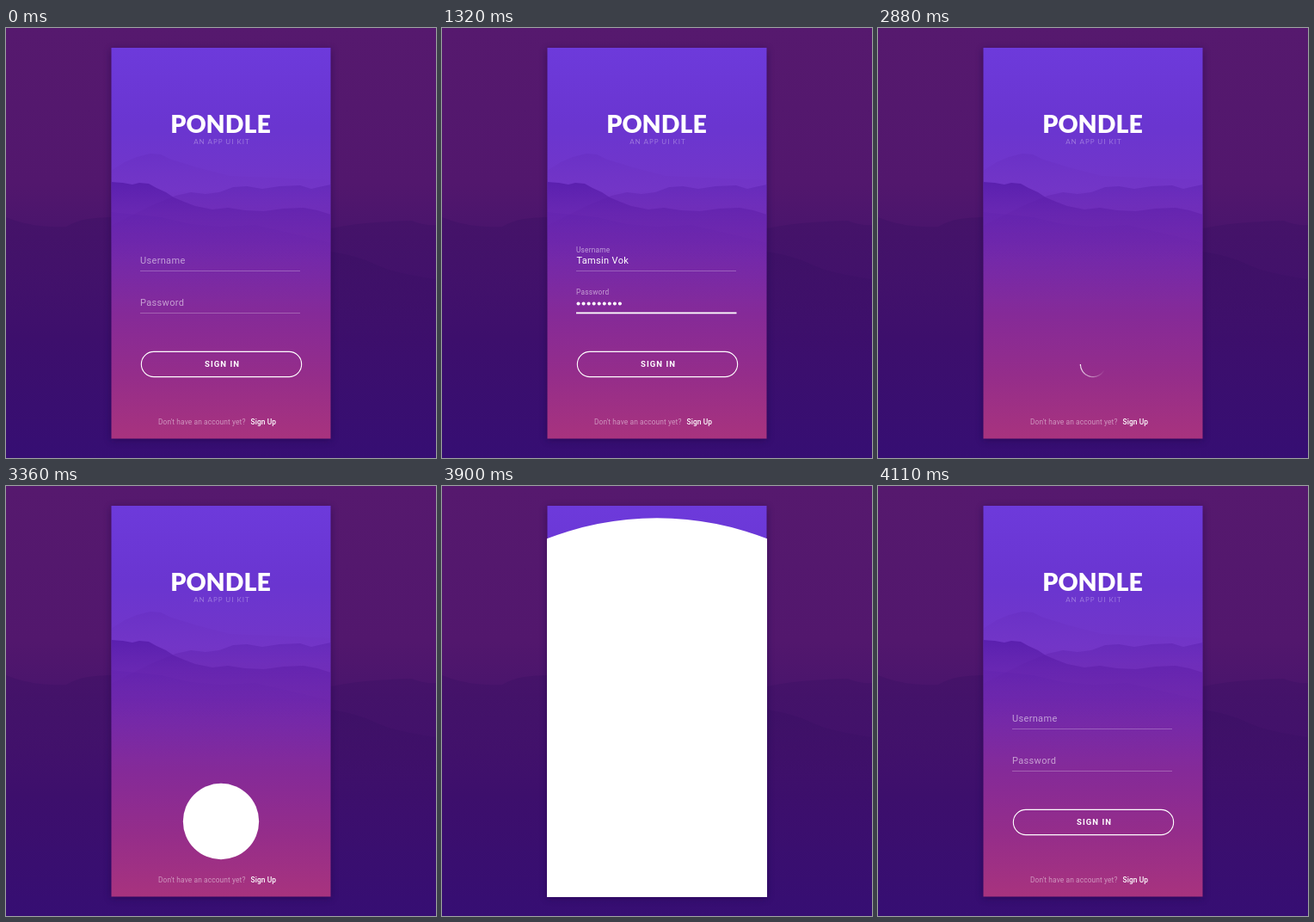
These frames come from a looping animation (500x500 px, 4.17 s). An HTML page:

```html
<!DOCTYPE html>
<html lang="en">
<head>
<meta charset="utf-8">
<title>Sign in</title>
<style>
  html, body { margin: 0; width: 100%; height: 100%; overflow: hidden; background: #45136b; }
  svg { display: block; width: 100vw; height: 100vh; }
  text { font-family: Roboto, sans-serif; fill: #fff; white-space: pre; }
  .brand { font: 900 28.5px Lato, sans-serif; }
  .tag { font: 400 8px Lato, sans-serif; letter-spacing: 1px; opacity: .32; }
  .label, .value { font-size: 11px; letter-spacing: .33px; }
  .label { opacity: .55; }
  .button { font-size: 9.5px; font-weight: 700; letter-spacing: 1.05px; }
  .foot { font-size: 8.4px; letter-spacing: .1px; }
  .link { font-weight: 500; }
</style>
</head>
<body>
<svg viewBox="0 0 500 500">
  <defs>
    <linearGradient id="back" x2="0" y2="1">
      <stop offset="0" stop-color="#56196e"/>
      <stop offset=".36" stop-color="#52176d"/>
      <stop offset=".5" stop-color="#48146c"/>
      <stop offset=".72" stop-color="#3d0f6c"/>
      <stop offset="1" stop-color="#360e73"/>
    </linearGradient>
    <linearGradient id="sky" x2="0" y2="1">
      <stop offset="0" stop-color="#6d3adb"/>
      <stop offset=".2" stop-color="#6a35d0"/>
      <stop offset=".36" stop-color="#7336c8"/>
      <stop offset=".5" stop-color="#752cb0"/>
      <stop offset=".68" stop-color="#852a98"/>
      <stop offset=".84" stop-color="#952d8a"/>
      <stop offset="1" stop-color="#a8337e"/>
    </linearGradient>
    <linearGradient id="haze" x2="0" y2="1">
      <stop offset="0" stop-color="#541aa8" stop-opacity=".8"/>
      <stop offset=".25" stop-color="#5c1ca6" stop-opacity=".48"/>
      <stop offset=".55" stop-color="#621da2" stop-opacity=".2"/>
      <stop offset="1" stop-color="#6a1f9e" stop-opacity="0"/>
    </linearGradient>
    <linearGradient id="dusk" x2="0" y2="1">
      <stop offset="0" stop-color="#340d60" stop-opacity=".3"/>
      <stop offset="1" stop-color="#340d60" stop-opacity="0"/>
    </linearGradient>
    <filter id="blur" x="-20%" y="-20%" width="140%" height="140%"><feGaussianBlur stdDeviation="4"/></filter>
    <clipPath id="card"><rect x="122.5" y="23" width="255" height="454.5"/></clipPath>
    <clipPath id="cover"><rect x="122" y="23" width="256" height="455"/></clipPath>
  </defs>

  <rect width="500" height="500" fill="url(#back)"/>
  <g fill="url(#dusk)">
    <path d="M0 220Q20 228 40 230T70 231Q82 224 95 222T122 220L160 226L378 233Q400 228 430 226T472 224Q485 230 500 229V340H0Z"/>
    <path d="M250 258L378 260Q410 265 430 275T500 292V380H250Z"/>
  </g>
  <rect x="122.5" y="25" width="255" height="454" fill="#1b0540" opacity=".5" filter="url(#blur)"/>

  <g clip-path="url(#card)">
    <rect x="122" y="23" width="256" height="455" fill="url(#sky)"/>
    <g fill="url(#haze)">
      <path opacity=".2" d="M122 166L138 156L152 150L168 146L180 147L192 153L206 157L222 162L260 172L378 177V210H122Z"/>
      <path opacity=".5" d="M122 230L170 206L197 195L215 191L232 193L248 191L264 185L280 184L298 187L318 184L342 183L355 187L368 184L378 182V270H122Z"/>
      <path d="M122 179L136 180L147 182L155 180L166 181L175 186L186 191L195 197L207 202L220 207L240 211L258 209L278 212L300 213L322 210L346 209L362 212L378 217V320H122Z"/>
      <path opacity=".2" d="M122 214L180 220L215 228L250 231L290 229L320 236L350 243L378 250V330H122Z"/>
    </g>
    <text class="brand" x="249.5" y="122" text-anchor="middle">PONDLE</text>
    <text class="tag" x="251" y="135" text-anchor="middle">AN APP UI KIT</text>
    <g id="fields"></g>
    <g id="button">
      <rect id="pill" y="376.4" height="29.2" rx="14.6" fill="none" stroke="#fff" stroke-width="1.1"/>
      <text class="button" id="caption" x="231" y="394">SIGN IN</text>
    </g>
    <g id="spinner" fill="none" stroke="#fff" stroke-width="1.2"></g>
    <text class="foot" x="177" y="461" opacity=".48">Don't have an account yet?</text>
    <text class="foot link" x="284.6" y="461">Sign Up</text>
  </g>
  <g clip-path="url(#cover)"><circle id="disc" cx="250" cy="390" fill="#fff"/></g>
</svg>

<script>
const LOOP = 4170, RESET = 3870;
const NAME = 'Tamsin Vok', DOTS = 9;
const $ = id => document.getElementById(id);

const clamp = v => Math.min(1, Math.max(0, v));
const span = (t, from, to) => clamp((t - from) / (to - from));
const smooth = p => (1 - Math.cos(Math.PI * p)) / 2;
const cubic = p => p < .5 ? 4 * p ** 3 : 1 - 4 * (1 - p) ** 3;

function add(parent, tag, attrs, text = '') {
  const el = document.createElementNS('http://www.w3.org/2000/svg', tag);
  for (const key in attrs) el.setAttribute(key, attrs[key]);
  el.textContent = text;
  parent.append(el);
  return el;
}
const set = (el, key, value) => el.setAttribute(key, value);

// A labelled input whose label floats up and whose underline grows on focus.
function makeField(label, base, focusAt, blurAt) {
  const root = $('fields');
  const title = add(root, 'text', { class: 'label' }, label);
  add(root, 'rect', { x: 156, y: base + 8, width: 186, height: 1, fill: '#fff', opacity: .25 });
  const line = add(root, 'rect', { x: 156, y: base + 7.5, height: 1.8, fill: '#fff' });
  return t => {
    const lift = smooth(span(t, focusAt, focusAt + 240));
    set(title, 'transform', `translate(156 ${base - 13 * lift}) scale(${1 - .25 * lift})`);
    set(line, 'width', 186.5 * smooth(span(t, focusAt, focusAt + 270)));
    set(line, 'opacity', 1 - span(t, blurAt, blurAt + 150));
  };
}

const drawUser = makeField('Username', 274, 10, 790);
const drawPass = makeField('Password', 323, 800, 1470);
const typed = add($('fields'), 'text', { class: 'value', x: 156.5, y: 274 });
const dots = Array.from({ length: DOTS }, (_, i) =>
  add($('fields'), 'circle', { cx: 158.5 + 6.05 * i, cy: 320.4, r: 2, fill: '#fff' }));

// Arc with a fading tail; its bright head points right at zero rotation.
const TAIL = 150, PARTS = 30;
const at = deg => {
  const a = deg * Math.PI / 180;
  return `${14.6 * Math.cos(a)} ${14.6 * Math.sin(a)}`;
};
for (let i = 0; i < PARTS; i++) {
  const step = TAIL / PARTS, a = -i * step;
  add($('spinner'), 'path', { d: `M${at(a)}A14.6 14.6 0 0 0 ${at(a - step)}`, opacity: 1 - i / PARTS });
}

function drawForm(t) {
  drawUser(t);
  drawPass(t);
  typed.textContent = NAME.slice(0, Math.floor(NAME.length * span(t, 300, 780)));
  const shown = Math.floor(DOTS * span(t, 1040, 1300));
  dots.forEach((dot, i) => set(dot, 'opacity', i < shown ? 1 : 0));

  const leave = span(t, 1680, 1920);
  set($('fields'), 'opacity', 1 - leave);
  set($('fields'), 'transform', `translate(0 ${-7 * leave})`);
  set($('caption'), 'opacity', 1 - span(t, 1700, 1860));

  const press = Math.sin(Math.PI * span(t, 1530, 1710));
  const width = 186.3 - 157.1 * cubic(span(t, 1770, 2160));
  set($('button'), 'transform', `translate(0 ${2.5 * press})`);
  set($('pill'), 'x', 250.5 - width / 2);
  set($('pill'), 'width', width);
  set($('pill'), 'opacity', 1 - span(t, 2180, 2250));

  set($('spinner'), 'opacity', span(t, 2180, 2240) * (t < 3330 ? 1 : 0));
  set($('spinner'), 'transform', `translate(250 391) rotate(${180 + (t - 2880) * 360 / 920})`);
}

function draw(t) {
  drawForm(t < RESET ? t : 0);
  const grow = 400 * smooth(span(t, 3292, 3612));
  const shrink = 405 * (1 - span(t, RESET, 4110));
  set($('disc'), 'r', t < RESET ? grow : shrink);
}

const start = performance.now();
function tick() {
  draw((performance.now() - start) % LOOP);
  requestAnimationFrame(tick);
}
tick();
</script>
</body>
</html>
```
